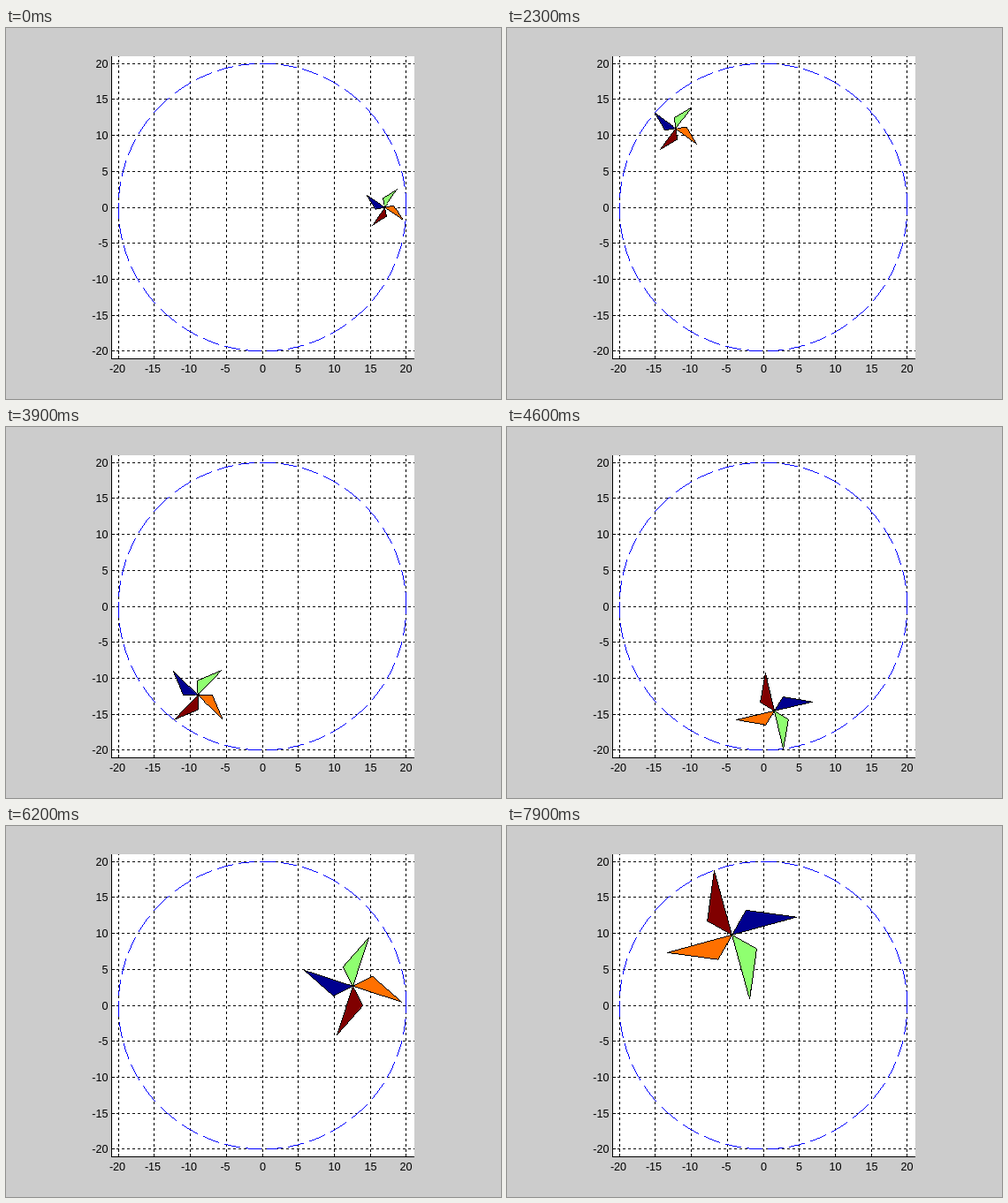
Animation of 560 by 420 pixels, one loop 8 s. Source, as an HTML page with a canvas:

```html
<!DOCTYPE html>
<html lang="en">
<head>
<meta charset="utf-8">
<title>Rolling pinwheel</title>
<style>
  html, body { margin: 0; width: 560px; height: 420px; overflow: hidden; background: #ccc; }
  canvas, svg { position: absolute; left: 0; top: 0; display: block; }
  text { font: 12.6px "Liberation Sans", Arial, sans-serif; fill: #000; }
</style>
</head>
<body>
<canvas id="plot" width="560" height="420"></canvas>
<canvas id="wheel" width="560" height="420"></canvas>
<svg id="labels" width="560" height="420"></svg>
<script>
const RAD = Math.PI / 180;
const SCALE = 8.14, CX = 289.55, CY = 202.55;
const RING = 20, STEP_MS = 100, STEPS = 80, TURN = 6;
const BOX = { left: 119, top: 32, right: 461, bottom: 374 };
const PETALS = ['#8fff70', '#00008f', '#800000', '#ff7000'];

const px = x => CX + x * SCALE;
const py = y => CY - y * SCALE;
const context = id => document.getElementById(id).getContext('2d');

function dot(g, x, y) {
  g.fillRect(Math.round(x), Math.round(y), 1, 1);
}

// Hard-edged one pixel line
function line(g, [x1, y1], [x2, y2]) {
  const n = Math.max(1, Math.round(Math.max(Math.abs(x2 - x1), Math.abs(y2 - y1))));
  for (let i = 0; i <= n; i++) dot(g, x1 + (x2 - x1) * i / n, y1 + (y2 - y1) * i / n);
}

function addLabel(value, x, y, anchor) {
  const t = document.createElementNS('http://www.w3.org/2000/svg', 'text');
  t.setAttribute('x', x);
  t.setAttribute('y', y);
  t.setAttribute('text-anchor', anchor);
  t.textContent = value;
  document.getElementById('labels').append(t);
}

function drawPlot(g) {
  const { left, top, right, bottom } = BOX;
  const width = right - left + 1, height = bottom - top + 1;
  g.fillStyle = '#fff';
  g.fillRect(left, top, width, height);

  g.save();
  g.beginPath();
  g.rect(left, top, width, height);
  g.clip();
  g.fillStyle = '#000';
  for (let v = -20; v <= 20; v += 5) {
    const x = Math.round(px(v)), y = Math.round(py(v));
    for (let p = left; p <= right; p += 6) g.fillRect(p, y, 3, 1);
    for (let p = bottom; p >= top; p -= 6) g.fillRect(x, p - 2, 1, 3);
    g.fillRect(left, y, 4, 1);
    g.fillRect(x, bottom - 3, 1, 4);
    addLabel(v, 115.5, y + 5, 'end');
    addLabel(v, x + (v < 0 ? -1 : 0.5), 390, 'middle');
  }
  g.fillRect(left, top, 1, height);
  g.fillRect(left, bottom, width, 1);
  g.restore();

  // Dashes are counted in pixels along the steeper axis
  g.fillStyle = '#00f';
  const radius = RING * SCALE;
  for (let a = 0, n = 0; a < 2 * Math.PI; n++) {
    const c = Math.cos(a), s = Math.sin(a);
    if (n % 24 < 18) dot(g, CX + radius * c, CY - radius * s);
    a += 1 / (radius * Math.max(Math.abs(c), Math.abs(s)));
  }
}

const sizeAt = k => 10 - 7 * Math.cos(1.0675 * (k - 0.3) * RAD);

// Rolling inside the ring: spin adds up as the wheel grows
const spins = [];
for (let k = 0, spin = 90; k < STEPS; k++) {
  spin -= TURN * (RING / sizeAt(k) - 1);
  spins.push(spin);
}

function drawWheel(g, k) {
  const size = sizeAt(k), orbit = RING - size, turn = k * TURN * RAD;
  const x = px(orbit * Math.cos(turn)), y = py(orbit * Math.sin(turn));
  const point = (length, deg) => [
    x + length * SCALE * Math.cos(deg * RAD),
    y - length * SCALE * Math.sin(deg * RAD)
  ];
  g.clearRect(0, 0, 560, 420);
  PETALS.forEach((color, i) => {
    const deg = spins[k] + 90 * i;
    const shape = [[x, y], point(size, deg), point(size * 0.3 * Math.SQRT2, deg + 45)];
    g.fillStyle = color;
    g.beginPath();
    shape.forEach(p => g.lineTo(p[0] + 0.5, p[1] + 0.5));
    g.fill();
    g.fillStyle = '#000';
    shape.forEach((p, j) => line(g, p, shape[(j + 1) % 3]));
  });
}

drawPlot(context('plot'));
const wheel = context('wheel');
const start = performance.now();
function tick() {
  const t = Math.max(0, performance.now() - start);
  drawWheel(wheel, Math.floor(t / STEP_MS) % STEPS);
  requestAnimationFrame(tick);
}
tick();
</script>
</body>
</html>
```
